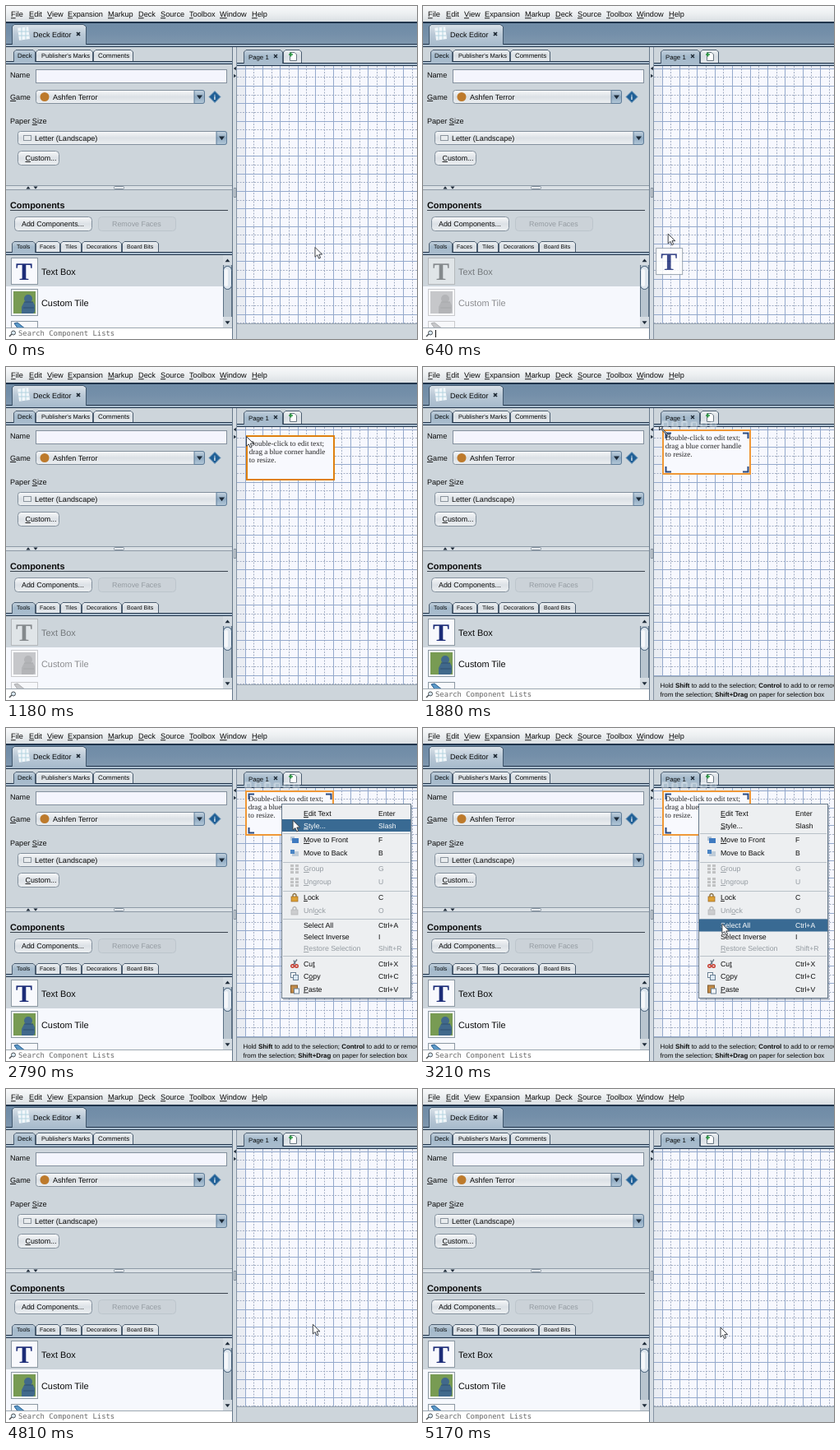
Animation of 500x405 px, one loop 5.63 s. Source, as an HTML page:

```html
<!DOCTYPE html>
<html lang="en">
<head>
<meta charset="utf-8">
<title>Deck Editor</title>
<style>
html, body { margin: 0; width: 100%; height: 100%; overflow: hidden; background: #cdd5db; }
svg { display: block; width: 500px; height: 405px; }
text { font-family: "Liberation Sans", Arial, sans-serif; fill: #0a0a0a; text-rendering: geometricPrecision; white-space: pre; }
.u { text-decoration: underline; }
.b { font-weight: bold; }
.serif { font-family: "Liberation Serif", Tinos, serif; }
.mono { font-family: "DejaVu Sans Mono", monospace; }
.dim { filter: grayscale(1); opacity: .45; }
.off text { fill: #949ba1; }
.off .icon { filter: grayscale(1); opacity: .45; }
.on text { fill: #fff; }
.item .bar { visibility: hidden; }
.item.on .bar { visibility: visible; }
</style>
</head>
<body>
<svg id="stage" viewBox="0 0 500 405" xmlns="http://www.w3.org/2000/svg"></svg>
<script>
const LOOP = 5630;
const PANEL = '#cdd5db', LINE = '#20344b', NAVY = '#1c2c78', EDGE = '#83909d', STRIP = '#a9bccd';

// An underscore marks the mnemonic letter.
const text = (x, y, s, size = 9.1, attr = '') =>
  `<text x="${x}" y="${y}" font-size="${size}" ${attr}>${s.replace(/_(.)/, '<tspan class="u">$1</tspan>')}</text>`;
const rect = (x, y, w, h, fill, attr = '') =>
  `<rect x="${x}" y="${y}" width="${w}" height="${h}" fill="${fill}" ${attr}/>`;
const path = (d, fill = 'none', stroke = 'none', width = 1, attr = '') =>
  `<path d="${d}" fill="${fill}" stroke="${stroke}" stroke-width="${width}" ${attr}/>`;
const circle = (x, y, r, fill, attr = '') => `<circle cx="${x}" cy="${y}" r="${r}" fill="${fill}" ${attr}/>`;
const frame = (x, y, w, h, fill, stroke = EDGE, r = 0) =>
  rect(x + .5, y + .5, w - 1, h - 1, fill, `stroke="${stroke}" rx="${r}"`);
const gradient = (id, ...stops) => `<linearGradient id="${id}" x2="0" y2="1">${
  stops.map((c, i) => `<stop offset="${i / (stops.length - 1)}" stop-color="${c}"/>`).join('')}</linearGradient>`;
const group = (id, body, attr = '') => `<g id="${id}" ${attr}>${body}</g>`;
const triangle = (x, y, r, turn, fill = '#1d2a38') =>
  path(`M${-r} ${r * .6}L0 ${-r * .7}L${r} ${r * .6}Z`, fill, 'none', 1, `transform="translate(${x} ${y}) rotate(${turn})"`);
const tabStrip = (x, y, w) => rect(x, y, w, 4, LINE) + rect(x, y + 1, w, 2, STRIP);

const defs = `<defs>
  ${gradient('menubar', '#f8f9fa', '#eceff1', '#dadfe3')}
  ${gradient('band', '#6f8ba6', '#748fa9', '#7f97ae')}
  ${gradient('docTab', '#dbe3ea', '#b9c8d6', STRIP)}
  ${gradient('active', '#c3d0dc', '#a3b9cb', STRIP)}
  ${gradient('idle', '#eef1f3', '#d9dfe4', '#e5e9ed')}
  ${gradient('button', '#f7f8f9', '#dce1e6', '#eceff1')}
  ${gradient('arrow', '#c5d3df', '#8faac2', '#b4c8d8')}
  <clipPath id="listClip"><rect y="303" width="264" height="88"/></clipPath>
  <clipPath id="paperClip"><rect x="281" y="73" width="219" height="313"/></clipPath>
</defs>`;

function tab(x, y, w, h, label, size, active, textX) {
  const bottom = y + h + (active ? 1 : 0);
  return path(`M${x + .5} ${bottom}V${y + 3}L${x + 3} ${y + .5}H${x + w - 3}L${x + w - .5} ${y + 3}V${bottom}`,
    `url(#${active ? 'active' : 'idle'})`, '#4b5d70') + text(textX, y + h - 3.7, label, size);
}

function combo(x, y, w, label, labelX) {
  return frame(x, y, w, 17, 'url(#button)', EDGE, 3) +
    path(`M${x + w - 13} ${y + .5}h10q2.5 0 2.5 2.5v11q0 2.5 -2.5 2.5h-10Z`, 'url(#arrow)', '#5f7c98') +
    triangle(x + w - 6.5, y + 8.7, 3.5, 180) + text(labelX, y + 11.8, label);
}

function button(x, y, w, label, labelX, attr = '', edge = EDGE) {
  return `<g ${attr}>${frame(x, y, w, 18, edge === EDGE ? 'url(#button)' : '#cbd2d8', edge, 4)}${text(labelX, y + 12, label, 8.9)}</g>`;
}

function header() {
  const menus = [['_File', 6], ['_Edit', 28], ['_View', 50], ['_Expansion', 75], ['_Markup', 124], ['_Deck', 161],
    ['_Source', 188], ['_Toolbox', 223], ['_Window', 260], ['_Help', 299]];
  return rect(0, 0, 500, 19, 'url(#menubar)') + rect(0, 19, 500, 2, LINE) +
    menus.map(([s, x]) => text(x, 13.3, s, 9.2)).join('') +
    rect(0, 21, 500, 25, 'url(#band)') + tabStrip(0, 46, 500) +
    path('M7.5 47V25L10 22.5H94L97.5 25V47', 'url(#docTab)', '#40566c') +
    rect(15, 26, 13, 15, '#f2f7fa', 'transform="rotate(-7 21 33)"') +
    path('M15 31H28M15 36H28M19 26V41M24 26V41', 'none', '#b3d3e0') +
    text(33, 37.5, 'Deck Editor', 9) + path('M86 32l4 4m0 -4l-4 4', 'none', '#18232e', 1.7);
}

function deckForm() {
  return tabStrip(0, 67, 275) + tab(9, 53, 27, 14, 'Deck', 7.7, true, 14) +
    tab(36, 53, 70, 14, "Publisher's Marks", 7.5, false, 43) + tab(106, 53, 49, 14, 'Comments', 7.9, false, 112) +
    text(5, 87, 'Name') + frame(36, 77, 233, 17, '#f4f5fd') +
    text(5, 114, '_Game') + combo(36, 102, 206, 'Ashfen Terror', 57) +
    circle(47, 110.5, 5.5, '#bd7a2c') +
    path('M254 103.5L261 110.5L254 117.5L247 110.5Z', '#1f5f96', '#6c95b8') +
    text(252.8, 113.5, 'i', 8.5, 'class="b" style="fill:#fff"') +
    text(5, 143, 'Paper _Size') + combo(14, 152, 255, 'Letter (Landscape)', 35) +
    frame(21, 157, 10, 7, '#e9ecee', '#8b949d') + button(14, 176, 51, '_Custom...', 23.5) +
    rect(0, 218, 275, 1, '#8d9aa6') + rect(0, 219, 275, 4, '#dbe1e6') + rect(0, 223, 275, 1, '#8d9aa6') +
    triangle(27, 221, 2.5, 0) + triangle(36, 221, 2.5, 180) + frame(131, 219, 13, 4, '#e7ebee', EDGE, 1);
}

function componentRows() {
  const tile = y => frame(6, y, 33, 33, '#f8f9fd', '#8c98a3');
  const rows = rect(0, 303, 264, 38, PANEL) + rect(0, 341, 264, 50, '#f6f8fd');
  const content = tile(306) + text(12, 332.5, 'T', 30, `class="serif b" style="fill:${NAVY}"`) + text(43, 327, 'Text Box', 10.9) +
    tile(344) + rect(9, 347, 27, 27, '#789b53') +
    path('M19 374V366L22 360H33L35 364V372L33 374Z', '#41698b') + circle(27, 356, 5, '#41698b') +
    path('M22 360H33M21 367H34', 'none', '#2d4e70') + text(43, 365, 'Custom Tile', 10.9) +
    tile(383) + path('M10 386L14 385L24 393H15Z', '#5a98c8', '#2b5d8c');
  return rows + group('content', content, 'clip-path="url(#listClip)"');
}

function scrollBar() {
  return rect(264, 303, 11, 88, '#d5dce2') + rect(264, 315, 11, 63, '#b9c5cf') +
    rect(264, 315, 1, 63, '#5b6f83') + rect(274, 315, 1, 63, '#5b6f83') +
    frame(264, 316, 11, 29, '#dce5ed', '#3f5a75', 5) + rect(266, 320, 4, 21, '#fff', 'rx="2" opacity=".7"') +
    triangle(269.5, 309.5, 3, 0) + triangle(269.5, 385, 3, 180);
}

function componentPanel() {
  const tabs = [['Tools', 7, 29, 13], ['Faces', 36, 30, 41], ['Tiles', 66, 26, 72], ['Decorations', 92, 49, 98], ['Board Bits', 141, 45, 147]];
  return text(5, 246, 'Components', 10.9, 'class="b"') + rect(5, 248, 265, 1, '#39434d') +
    button(10, 256, 95, 'Add Components...', 19) + button(112, 256, 95, 'Remove Faces', 129, 'class="off"', '#bcc5cc') +
    tabStrip(0, 299, 275) + tabs.map(([s, x, w, tx], i) => tab(x, 286, w, 13, s, 7, !i, tx)).join('') +
    componentRows() + scrollBar() +
    rect(0, 391, 275, 14, '#fff') + rect(0, 391, 275, 1, '#9ba6b0') +
    path('M4 402L7 399', 'none', '#4d5357', 1.5) + circle(9, 397.5, 2.5, '#dbeaf3', 'stroke="#4d5357"') +
    group('search', text(15, 401, 'Search Component Lists', 8.85, 'class="mono" style="fill:#686868"')) +
    group('caret', rect(15, 394, 1, 9, '#111'));
}

function paper() {
  const pitch = 21.36;
  const snap = v => Math.floor(v) + .5;
  const lines = (x, y) => `M${snap(x)} 73V386M281 ${snap(y)}H500`;
  let solid = '', dotted = '';
  for (let i = 0; i < 16; i++) {
    const x = 291.2 + i * pitch, y = 76 + i * pitch;
    solid += lines(x, y);
    dotted += lines(x + pitch / 2, y + pitch / 2);
  }
  return rect(281, 73, 219, 313, '#f7f8fe') + rect(281, 73, 10, 313, '#e4e9ee', 'opacity=".65"') +
    rect(281, 73, 219, 4, '#e4e9f0', 'opacity=".65"') +
    group('grid', path(dotted, 'none', '#a3aec4', 1, 'stroke-dasharray="2 1.5"') +
      path(solid, 'none', '#94a9cc', 1), 'clip-path="url(#paperClip)"');
}

function pagePane() {
  return rect(275, 50, 6, 355, '#d6dde3') + rect(275, 50, 1, 355, '#66788a') + rect(280, 50, 1, 355, '#8493a2') +
    triangle(278.5, 76, 2.3, -90) + triangle(278.5, 85, 2.3, 90) + frame(277, 221, 3, 12, '#e7ebee') +
    tabStrip(281, 69, 219) + tab(337, 53, 23, 16, '', 8, false, 340) +
    tab(289, 53, 48, 16, 'Page 1', 7.8, true, 295) + path('M326 59l4 4m0 -4l-4 4', 'none', '#18232e', 1.2) +
    path('M345.5 56.5H351L353.5 59V66.5H345.5Z', '#fff', '#687681') + path('M344 59h5m-2.5 -2.5v5', 'none', '#2d9a43', 1.7) +
    paper() + rect(281, 386, 219, 1, '#9aa6b1');
}

function textBox() {
  const lines = ['Double-click to edit text;', 'drag a blue corner handle', 'to resize.'];
  const handles = 'M4.5 11V4.5H11M98 4.5H104.5V11M104.5 45V51.5H98M11 51.5H4.5V45';
  return rect(1, 1, 106, 53, '#f8f9fe', 'id="outline" stroke-width="2"') +
    lines.map((s, i) => text(3.8, 13 + i * 10.2, s, 9.1, 'class="serif" style="fill:#222"')).join('') +
    group('handles', path(handles, 'none', '#2b4a80', 2));
}

const fadedBar = () => [0, 1, 2, 3, 4, 5].map(i =>
  frame(290 + i * 11.7, 65 + i % 2, 9, 10, '#f4f7fa', '#cbd6df', 2) + rect(293 + i * 11.7, 68, 4, 4, '#b4c8d2')).join('');

function statusLine() {
  const bold = s => `<tspan class="b">${s}</tspan>`;
  return rect(281, 376, 219, 29, PANEL) + rect(281, 376, 219, 1, '#9aa6b1') +
    text(288.5, 389.5, `Hold ${bold('Shift')} to add to the selection; ${bold('Control')} to add to or remove`, 7.9) +
    text(288.5, 400.5, `from the selection; ${bold('Shift+Drag')} on paper for selection box`, 7.9);
}

const sheets = (a, b) => frame(0, 0, 7, 7, a, '#687e92') + frame(3, 3, 7, 7, b, '#687e92');
const lock = rect(1, 4, 8, 6, '#dda136', 'stroke="#946322" stroke-width=".7"') + path('M3 4V2Q5 -1 7 2V4', 'none', '#8c7347', 1.4);
const cells = [0, 6].map(x => [0, 4, 8].map(y => rect(x, y, 4, 3, '#7891a8')).join('')).join('');
const scissors = path('M8 0L3 7M4 1L6 6', 'none', '#6a7886', 1.4) +
  [2.5, 7.5].map(x => circle(x, 8, 1.8, 'none', 'stroke="#c63629" stroke-width="1.4"')).join('');
const icons = {
  front: rect(0, 1, 5, 5, '#b7c6d4') + rect(2, 3, 8, 6, '#3f7ac0'),
  back: rect(2, 3, 8, 6, '#bfccd8') + rect(0, 1, 5, 5, '#4984c4'),
  cells, lock, cut: scissors,
  copy: sheets('#fff', '#dce9f6'),
  paste: frame(0, 0, 9, 10, '#c28b49', '#805a2d') + frame(4, 4, 7, 7, '#f3f7fb', '#6c8295')
};
const items = [
  ['_Edit Text', 'Enter', 107], ['_Style...', 'Slash', 121.5],
  ['_Move to Front', 'F', 139, 'front'], ['Move to Back', 'B', 155, 'back'],
  ['_Group', 'G', 174, 'cells', true], ['_Ungroup', 'U', 190, 'cells', true],
  ['_Lock', 'C', 209, 'lock'], ['Unl_ock', 'O', 225, 'lock', true],
  ['Select All', 'Ctrl+A', 243], ['Select Inverse', 'I', 257], ['_Restore Selection', 'Shift+R', 271, '', true],
  ['Cu_t', 'Ctrl+X', 289.5, 'cut'], ['C_opy', 'Ctrl+C', 305, 'copy'], ['_Paste', 'Ctrl+V', 320.5, 'paste']
];

function popup() {
  const rows = items.map(([label, key, y, icon, off]) => `<g class="item${off ? ' off' : ''}">
    ${rect(336, y - 10.5, 156, 15, '#396a93', 'class="bar"')}
    ${icon ? `<g class="icon" transform="translate(346 ${y - 8})">${icons[icon]}</g>` : ''}
    ${text(362, y, label, 8.8)}${text(453, y, key, 8.6)}</g>`).join('');
  const rules = [128, 163, 198, 232, 277].map(y => rect(337, y, 154, 1, '#b9c1c8')).join('');
  return rect(337, 94, 157, 237, '#33455a', 'opacity=".3"') + frame(335, 92, 158, 237, '#edeff1', '#66788a') + rules + rows;
}

const dragIcon = frame(0, 0, 33, 33, '#fff', '#8c98a3') + text(6, 26.5, 'T', 30, `class="serif b" style="fill:${NAVY}"`);
const arrowCursor = path('M0 0V11.8L2.8 9.3L4.7 13.6L6.6 12.7L4.8 8.6H8.6Z', '#fff', '#3c4046', 1);
const resizeCursor = path('M-5.5 -5.5h4.5l-4.5 4.5ZM7 7h-4.5l4.5 -4.5Z', '#fff', '#26313d') +
  path('M-3 -3L4.5 4.5', 'none', '#26313d', 2) + path('M-3 -3L4.5 4.5', 'none', '#fff', .8);

document.getElementById('stage').innerHTML = defs + rect(0, 0, 500, 405, PANEL) + header() + deckForm() +
  componentPanel() + pagePane() + group('bar', fadedBar(), 'opacity=".4"') + group('box', textBox()) +
  group('status', statusLine()) + group('popup', popup()) + group('drag', dragIcon, 'opacity=".85"') +
  group('pointer', arrowCursor) + group('resize', resizeCursor);

const el = id => document.getElementById(id);
const show = (id, on) => el(id).setAttribute('visibility', on ? 'visible' : 'hidden');
const move = (id, x, y) => el(id).setAttribute('transform', `translate(${x.toFixed(2)} ${y.toFixed(2)})`);
const rowEls = [...document.querySelectorAll('.item')];

const pointerPath = [
  [0, 376, 293.5], [30, 376, 293.5], [300, 35, 322], [350, 35, 322], [580, 258, 294], [640, 297.5, 277.5],
  [850, 436, 190], [1100, 292.5, 84.5], [1400, 292.5, 84.5], [1560, 291, 77], [1880, 291, 77],
  [2310, 336, 92], [2700, 336, 92], [2790, 349, 112], [3270, 366, 256], [3780, 374, 286],
  [4790, 374, 286], [5170, 362, 290], [LOOP, 362, 290]
];
const boxPath = [[0, 292, 83], [1400, 292, 83], [1560, 291, 76], [LOOP, 291, 76]];

function at(points, t) {
  const i = Math.max(1, points.findIndex(p => p[0] > t));
  const [t0, x0, y0] = points[i - 1], [t1, x1, y1] = points[i];
  const k = (t - t0) / (t1 - t0);
  return [x0 + (x1 - x0) * k, y0 + (y1 - y0) * k];
}

function draw(t) {
  const within = (a, b) => t >= a && t < b;
  const [x, y] = at(pointerPath, t);
  const dragging = within(350, 1790), selected = within(1790, 4810), resizing = within(1790, 1970);

  el('content').classList.toggle('dim', dragging);
  show('search', !dragging);
  show('caret', within(580, 1090) || within(1500, 1790));

  show('drag', within(350, 1120));
  move('drag', x - 15, y + 17);

  show('box', within(1180, 4810));
  move('box', ...at(boxPath, t));
  el('outline').setAttribute('stroke', selected ? '#ef9838' : '#df800f');
  for (const id of ['handles', 'bar', 'status']) show(id, selected);

  el('popup').style.display = within(2370, 4810) ? '' : 'none';
  rowEls.forEach((row, i) => {
    const [, , base, , off] = items[i];
    row.classList.toggle('on', t >= 2730 && !off && y >= base - 10.5 && y < base + 4.5);
  });

  show('pointer', !resizing);
  show('resize', resizing);
  move('pointer', x, y);
  move('resize', x + 2, y + 1);
}

const start = performance.now();
function tick() {
  draw((performance.now() - start) % LOOP);
  requestAnimationFrame(tick);
}
tick();
</script>
</body>
</html>
```
